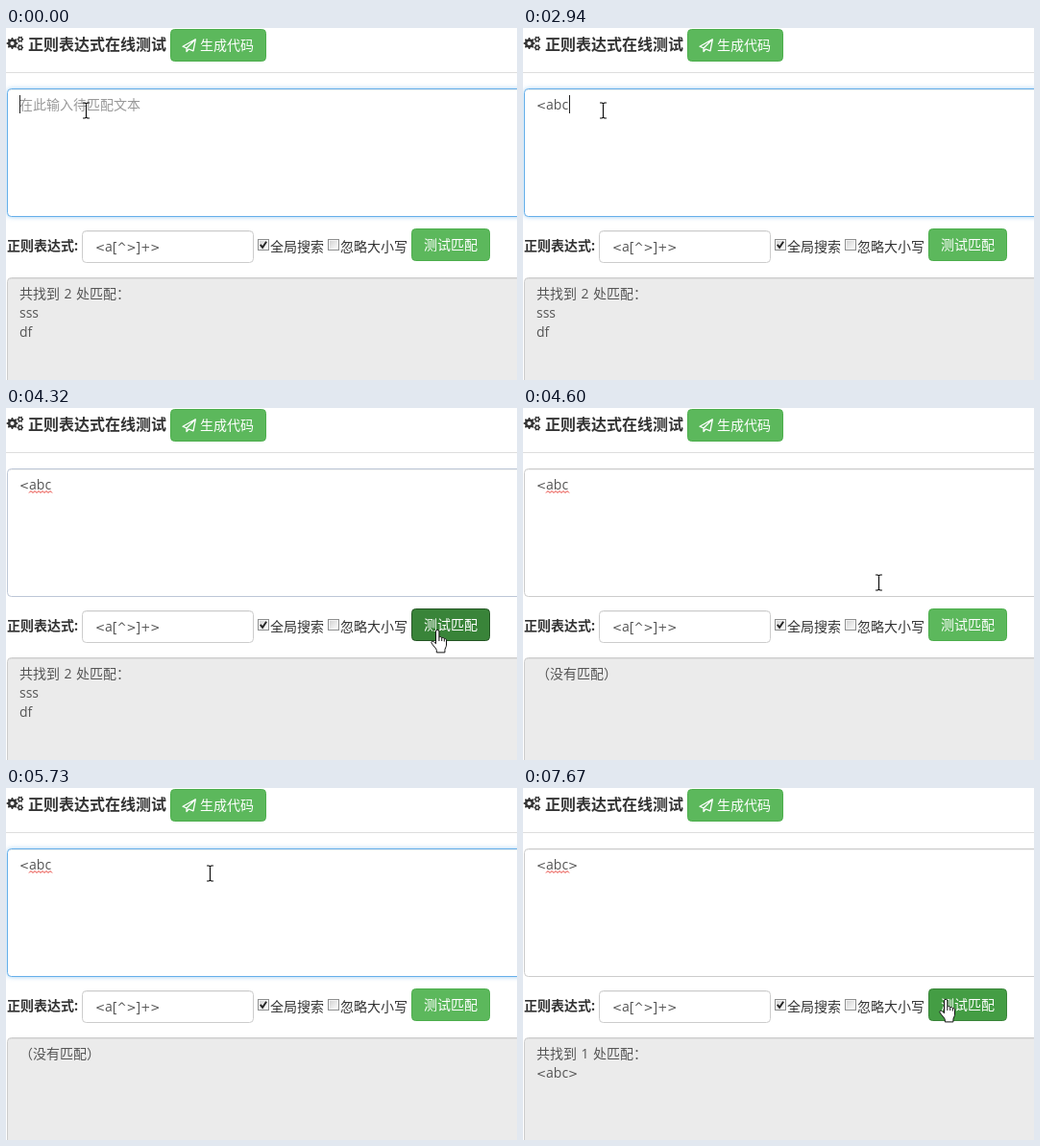
These frames come from a looping animation (532x367 px, 8000 ms). An HTML page:

```html
<!DOCTYPE html>
<html lang="zh-CN">
<head>
<meta charset="utf-8">
<title>正则表达式在线测试</title>
<style>
html, body { margin: 0; width: 100%; height: 100%; overflow: hidden; background: #fff; }
svg { display: block; width: 532px; height: 367px; }
text { font: 14px "Open Sans", "Noto Sans CJK SC", "Noto Sans CJK", sans-serif; fill: #333; white-space: pre; }
.bold { font-weight: 700; }
.field { fill: #555; }
.white { fill: #fff; }
.sym { font: 12px "DejaVu Sans", sans-serif; }
.focus { filter: drop-shadow(0 0 2.5px rgba(102, 175, 233, .6)); }
</style>
</head>
<body>
<svg viewBox="0 0 532 367">
  <defs>
    <linearGradient id="boxFill" x2="1" y2="1">
      <stop stop-color="#d4d4d4"/><stop offset="1" stop-color="#fafafa"/>
    </linearGradient>
    <g id="checkbox">
      <rect x=".5" y=".5" width="11" height="11" fill="#f4f4f4" stroke="#8e8f8f"/>
      <rect x="2" y="2" width="8" height="8" fill="url(#boxFill)"/>
    </g>
  </defs>
  <rect width="532" height="367" fill="#fff"/>

  <path id="gears" fill="#333" fill-rule="evenodd"/>
  <text class="bold" x="23" y="22.5" style="font-size:16px">正则表达式在线测试</text>
  <rect x="171.5" y="1.5" width="99" height="33" rx="4" fill="#5cb85c" stroke="#4cae4c"/>
  <path d="M197.3 11.8L184 19.2l4 1.8v3.6l2.2-2.6 4.8 1.8zM188 21l9.3-9.2" fill="none" stroke="#fff" stroke-width="1.3" stroke-linejoin="round"/>
  <text class="white" x="202" y="23">生成代码</text>
  <path d="M0 46.5H532" stroke="#ddd"/>

  <rect id="area" x="1.5" y="63.5" width="560" height="133" rx="4" fill="#fff"/>
  <path d="M4 64.5H532" stroke="#000" stroke-opacity=".06"/>
  <text id="hint" x="14" y="85" style="fill:#999">在此输入待匹配文本</text>
  <text id="typed" class="field" x="14" y="85"></text>
  <path id="squiggle" fill="none" stroke="#e8342c"/>
  <rect id="caret" y="70" width="1" height="19" fill="#222"/>

  <text class="bold" x="1" y="232">正则表达式:</text>
  <rect x="79.5" y="211.5" width="178" height="33" rx="4" fill="#fff" stroke="#ccc"/>
  <path d="M82 212.5H255" stroke="#000" stroke-opacity=".06"/>
  <text id="pattern" class="field" x="93" y="233"></text>
  <use href="#checkbox" x="262" y="220"/>
  <path d="M264.8 225.8l2.3 3 4-6" fill="none" stroke="#222" stroke-width="1.9"/>
  <text x="275" y="233">全局搜索</text>
  <use href="#checkbox" x="335" y="220"/>
  <text x="348" y="233">忽略大小写</text>
  <rect id="button" x="422.5" y="209.5" width="81" height="33" rx="4"/>
  <text class="white" x="435" y="231">测试匹配</text>

  <rect x="1.5" y="260.5" width="560" height="130" rx="4" fill="#ebebeb" stroke="#ccc"/>
  <path d="M4 261.5H532" stroke="#000" stroke-opacity=".05"/>
  <g id="results" style="word-spacing:.8px"></g>

  <g id="beam" fill="none">
    <path d="M-3.5-8H-1.2L0-7 1.2-8H3.5M0-7V7M-3.5 8H-1.2L0 7 1.2 8H3.5" stroke="#111" stroke-width="1.2"/>
  </g>
  <path id="arrow" d="M.5.8V15.6L4 12.3 6.5 18.3 8.9 17.3 6.4 11.5H11.2Z" fill="#fff" stroke="#111"/>
  <g id="hand" stroke="#111">
    <path d="M5.5 2a1.7 1.7 0 0 1 3.4 0v6c1-.8 2.6-.5 2.8 .8 1-.6 2.4-.3 2.6 .9 1-.4 2.2 .1 2.2 1.4v5c0 2-1.6 3.5-1.6 5.4v2.4h-8.6v-2.4c0-1.5-4-5-5.4-7.6-.6-1.4 1.2-2.2 2.4-1.2l2.2 2z" fill="#fff"/>
    <path d="M8.9 8v4M11.7 9v3M14.3 10v2.5" fill="none"/>
  </g>
</svg>
<script>
const $ = id => document.getElementById(id);
const LOOP = 8000;

// Each track lists [start ms, value...]; values hold until the next entry.
const tracks = {
  typed: [[0, ''], [990, '<'], [1680, '<a'], [2670, '<ab'], [2940, '<abc'], [6140, '<abc>']],
  caret: [[0, 1], [440, 0], [990, 1], [1520, 0], [1680, 1], [2260, 0], [2670, 1], [3490, 0],
    [3880, 1], [4190, 0], [5150, 1], [5730, 0], [6140, 1], [6690, 0], [7240, 1], [7670, 0]],
  border: [[0, '#66afe9'], [4190, '#a3bfdc'], [4320, '#bcc6d6'], [4470, '#ccc'],
    [5150, '#b0c6de'], [5300, '#66afe9'], [7670, '#ccc']],
  button: [[0, 'normal'], [3760, 'hover'], [4190, 'active'], [4470, 'hover'], [4600, 'normal'], [7240, 'hover']],
  results: [[0, ['共找到 2 处匹配：', 'sss', 'df']], [4470, ['（没有匹配）']], [7670, ['共找到 1 处匹配：', '<abc>']]],
  cursor: [[0, 'beam', 83, 86], [3490, 'beam', 124, 99], [3610, 'beam', 375, 194],
    [3760, 'hand', 427, 222], [3880, 'hand', 445, 236], [4040, 'hand', 449, 231],
    [4600, 'beam', 370, 182], [4750, 'beam', 290, 140], [4870, 'beam', 229, 99],
    [5020, 'beam', 212, 89], [6690, 'beam', 236, 104], [6810, 'beam', 360, 173],
    [6960, 'beam', 385, 188], [7090, 'arrow', 397, 212], [7240, 'hand', 440, 220]]
};
const buttonColors = {
  normal: ['#5cb85c', '#4cae4c'], hover: ['#449d44', '#398439'], active: ['#398439', '#255625']
};
const caretX = [14, 24, 32, 40, 48, 58];

const at = (name, t) => tracks[name].filter(step => step[0] <= t).pop().slice(1);

function set(el, attrs) {
  for (const key in attrs) el.setAttribute(key, attrs[key]);
}

const show = (el, on) => set(el, { visibility: on ? 'visible' : 'hidden' });

// Operators use a wider face than letters.
const markup = s => [...s].map(c => {
  const safe = c === '<' ? '&lt;' : c === '>' ? '&gt;' : c;
  return '<>^+'.includes(c) ? `<tspan class="sym">${safe}</tspan>` : safe;
}).join('');

function gear(cx, cy, r, hole, teeth) {
  const points = [];
  for (let i = 0; i < teeth * 4; i++) {
    const a = (i - .5) * Math.PI / teeth / 2;
    const d = i % 4 < 2 ? r : r * .76;
    points.push(`${(cx + d * Math.cos(a)).toFixed(2)} ${(cy + d * Math.sin(a)).toFixed(2)}`);
  }
  return `M${points.join('L')}ZM${cx - hole} ${cy}a${hole} ${hole} 0 1 0 ${2 * hole} 0a${hole} ${hole} 0 1 0 ${-2 * hole} 0Z`;
}

set($('gears'), { d: gear(6.5, 16, 6, 2.1, 8) + gear(14.8, 11.8, 3.4, 1.2, 6) + gear(14.8, 20.4, 3.4, 1.2, 6) });
set($('squiggle'), { d: 'M24 88.5' + 'l2-2l2 2'.repeat(6) });
$('pattern').innerHTML = markup('<a[^>]+>');

function render(t) {
  const [typed] = at('typed', t);
  $('typed').innerHTML = markup(typed);
  show($('hint'), !typed);
  show($('squiggle'), t >= 3880);

  set($('caret'), { x: caretX[typed.length] });
  show($('caret'), at('caret', t)[0]);

  const [border] = at('border', t);
  set($('area'), { stroke: border, class: border === '#66afe9' ? 'focus' : '' });

  const [fill, stroke] = buttonColors[at('button', t)[0]];
  set($('button'), { fill, stroke });

  $('results').innerHTML = at('results', t)[0]
    .map((line, i) => `<text class="field" x="14" y="${282 + i * 20}">${markup(line)}</text>`).join('');

  const [kind, x, y] = at('cursor', t);
  for (const id of ['beam', 'arrow', 'hand']) show($(id), id === kind);
  const dx = kind === 'hand' ? -7 : kind === 'beam' ? .5 : 0;
  set($(kind), { transform: `translate(${x + dx} ${y})` });
}

const start = performance.now();
function tick() {
  render((performance.now() - start) % LOOP);
  requestAnimationFrame(tick);
}
tick();
</script>
</body>
</html>
```
